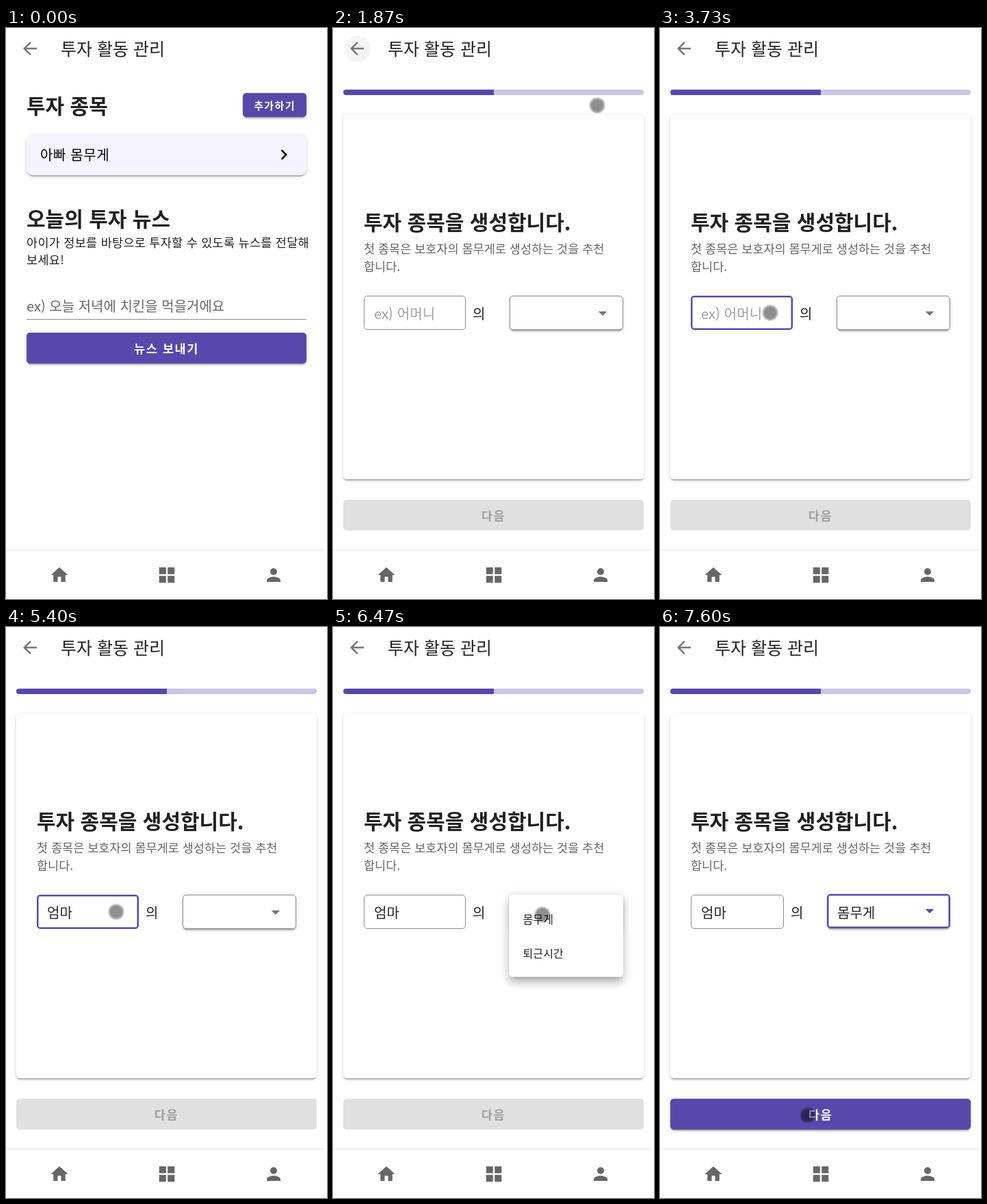
An HTML page that plays this animation: 469x834 px, repeating every 8000 ms.

```html
<!DOCTYPE html>
<html lang="ko">
<head>
<meta charset="utf-8">
<title>투자 활동 관리</title>
<style>
:root {
  --main: #5848ab;
  --ink: #212121;
  --low: 0 4px 1px -2.5px #0003, 0 2.5px 2.5px #00000024, 0 1px 6px #0000001f;
  --high: 0 6px 6px -4px #0003, 0 10px 12px 1px #00000024, 0 4px 17px 2px #0000001f;
  --focus: inset 0 0 0 1px #5848ab80;
}
html, body { margin: 0; width: 100%; height: 100%; overflow: hidden; background: #fff; }
#stage {
  position: relative; width: 469px; height: 834px; overflow: hidden; background: #fff; color: var(--ink);
  font-family: "Noto Sans CJK KR", "Noto Sans CJK JP", "Noto Sans CJK SC", "Noto Sans KR", sans-serif;
}
#stage * { box-sizing: border-box; }
#stage div, p, svg { position: absolute; margin: 0; }
p { line-height: 0; white-space: nowrap; font-size: 20px; }
svg { width: 30px; height: 30px; fill: #666; overflow: visible; }
.anim { animation: 8s step-end infinite; }
.page { inset: 0; }
.title { font-size: 25px; }
.head { font-size: 30px; font-weight: 700; }
.body { font-size: 17.5px; }
.spaced { letter-spacing: .016em; }
.grey { color: #666; }
.item { font-size: 16px; letter-spacing: .15px; left: 20.5px; }
.btn {
  display: flex; align-items: center; justify-content: center; border-radius: 5px;
  background: var(--main); color: #fff; box-shadow: var(--low);
  font-size: 17.5px; font-weight: 700; letter-spacing: .0893em; line-height: 1;
}
.field { border: 1px solid #8c8c8c; border-radius: 5px; top: 391px; height: 50px; }

/* 1% = 80 ms */
#first { animation-name: first; }
@keyframes first { 0% { opacity: 1 } 22.5% { opacity: 0 } }
#second { animation-name: second; }
@keyframes second { 0% { opacity: 0 } 22.5% { opacity: 1 } }
#halo { left: 15.5px; top: 10.5px; width: 39px; height: 39px; border-radius: 50%; background: #f4f4f4; animation-name: halo; }
@keyframes halo { 0% { opacity: 0 } 23.375% { opacity: 1 } 40% { opacity: 0 } }

#name { left: 45px; width: 149px; animation-name: name; }
@keyframes name {
  0% { width: 149px; border: 1px solid #8c8c8c; box-shadow: none }
  40% { width: 149px; border: 2px solid var(--main); box-shadow: var(--focus) }
  75.875% { width: 149px; border: 1px solid #8c8c8c; box-shadow: none }
  86.625% { width: 136px; border: 1px solid #8c8c8c; box-shadow: none }
}
#typed { left: 60px; top: 402px; width: 110px; height: 30px; overflow: hidden; }
#lines { font-size: 20px; line-height: 30px; white-space: nowrap; letter-spacing: .1px; animation-name: lines; }
#lines span { display: block; height: 30px; }
@keyframes lines {
  0% { transform: none }
  55% { transform: translateY(-30px) }
  55.875% { transform: translateY(-60px) }
  58.375% { transform: translateY(-90px) }
  60% { transform: translateY(-120px) }
  61.625% { transform: translateY(-150px) }
}
#caret { left: 60.5px; top: 404px; width: 1px; height: 24px; background: #000; animation-name: caret; }
@keyframes caret {
  0% { opacity: 0 }
  40% { opacity: 1 }
  46.625% { opacity: 0 }
  53.375% { opacity: 1; transform: none }
  55% { opacity: 1; transform: translateX(18px) }
  60% { opacity: 1; transform: translateX(36px) }
  67.5% { opacity: 0 }
  74.125% { opacity: 1; transform: translateX(36px) }
  75.875% { opacity: 0 }
}
#of { animation-name: of; }
@keyframes of { 0% { transform: none } 86.625% { transform: translateX(-13px) } }

#select { background: #fff; animation-name: select; }
@keyframes select {
  0% { left: 257.5px; width: 166.5px; top: 391px; border: 1px solid #8c8c8c; box-shadow: var(--low) }
  86.625% { left: 244px; width: 180px; top: 390px; border: 2px solid var(--main); box-shadow: var(--focus), var(--low) }
}
#value { animation-name: value; }
@keyframes value { 0% { opacity: 0 } 86.625% { opacity: 1 } }
#arrow { left: 379px; top: 402px; transform-origin: 50% 50%; animation-name: arrow; }
@keyframes arrow {
  0% { fill: #757575; transform: none }
  86.625% { fill: var(--main); transform: translateY(-2px) rotate(115deg) }
  87.5% { fill: var(--main); transform: translateY(-2px) rotate(55deg) }
  88.375% { fill: var(--main); transform: translateY(-2px) rotate(15deg) }
  89.125% { fill: var(--main); transform: translateY(-2px) }
}
#menu { left: 257px; top: 391px; width: 167px; height: 120px; border-radius: 5px; background: #fff; box-shadow: var(--high); transform-origin: 0 0; animation-name: menu; }
@keyframes menu {
  0% { opacity: 0 }
  78.375% { opacity: .6; transform: scale(.88) }
  79.125% { opacity: 1; transform: scale(.97) }
  80% { opacity: 1; transform: none }
  86.625% { opacity: .6; transform: none }
  87.5% { opacity: 0 }
}
#row { left: 0; top: 10.5px; width: 167px; height: 49.5px; overflow: hidden; animation-name: row; }
@keyframes row { 0% { background: #fff } 85% { background: #ededed } }
#ripple { left: 12.5px; top: -24px; width: 99px; height: 99px; border-radius: 50%; background: #bfb8db; animation-name: ripple; }
@keyframes ripple { 0% { opacity: 0 } 86.625% { opacity: 1 } }
#pick { animation-name: pick; }
@keyframes pick { 0% { color: var(--ink) } 86.625% { color: var(--main) } }

#next { left: 15px; top: 689px; width: 439px; height: 45px; animation-name: next; }
@keyframes next {
  0% { background: #e0e0e0; color: #9e9e9e; box-shadow: none }
  86.625% { background: var(--main); color: #fff; box-shadow: none }
  88.375% { background: var(--main); color: #fff; box-shadow: var(--low) }
}
#nav { left: 0; top: 764px; width: 469px; height: 70px; background: #fff; box-shadow: 0 -1px 6px #0000001c; }
#touch {
  left: -11.5px; top: -11.5px; width: 23px; height: 23px; border-radius: 50%;
  background: #00000070 padding-box; border: 2px solid #00000044; animation-name: touch;
}
@keyframes touch {
  0% { opacity: 0 }
  14.125% { opacity: 1; transform: translate(398.5px, 126.5px) }
  16.625% { opacity: 0 }
  19.125% { opacity: 1; transform: translate(385.5px, 112.5px) }
  31.625% { opacity: 0 }
  40% { opacity: 1; transform: translate(160.5px, 415.5px) }
  70% { opacity: 0 }
  75.875% { opacity: 1; transform: translate(305.5px, 419.5px); background-color: #00000070 }
  81.625% { opacity: 1; transform: translate(305.5px, 419.5px); background-color: #00000070; animation-timing-function: linear }
  85% { opacity: 1; transform: translate(306.5px, 432.5px); background-color: #00000094 }
  89.125% { opacity: 0 }
  95% { opacity: 1; transform: translate(215.5px, 712.5px); background-color: #00000078 }
}
</style>
</head>
<body>
<div id="stage">
  <div id="first" class="page anim">
    <p class="head" style="left:30px;top:112px">투자 종목</p>
    <div class="btn" style="left:346px;top:95px;width:93px;height:35px;font-size:15px">추가하기</div>
    <div style="left:30px;top:155px;width:409px;height:60px;border-radius:9px;background:#f5f3ff;box-shadow:var(--low)"></div>
    <p style="left:50px;top:185px;letter-spacing:.03125em;color:#000">아빠 몸무게</p>
    <svg viewBox="0 0 24 24" style="left:391px;top:170px;fill:#000"><path d="M10 6 8.6 7.4 13.2 12l-4.6 4.6L10 18l6-6z"/></svg>
    <p class="head" style="left:30px;top:277px">오늘의 투자 뉴스</p>
    <p class="body spaced" style="left:30px;top:312.5px">아이가 정보를 바탕으로 투자할 수 있도록 뉴스를 전달해</p>
    <p class="body spaced" style="left:30px;top:337.5px">보세요!</p>
    <p class="grey" style="left:30px;top:406px">ex) 오늘 저녁에 치킨을 먹을거에요</p>
    <div style="left:30px;top:425px;width:409px;height:1px;background:#8c8c8c"></div>
    <div class="btn" style="left:30px;top:445px;width:409px;height:45px">뉴스 보내기</div>
  </div>

  <div id="second" class="page anim">
    <div id="halo" class="anim"></div>
    <div style="left:15px;top:90px;width:439px;height:7.5px;border-radius:4px;background:linear-gradient(90deg,var(--main) 220px,#cbc4e7 0)"></div>
    <div style="left:15px;top:127px;width:439px;height:532px;border-radius:5px;background:#fff;box-shadow:var(--low)"></div>
    <p class="head" style="left:45px;top:282px">투자 종목을 생성합니다.</p>
    <p class="body grey" style="left:45px;top:322px">첫 종목은 보호자의 몸무게로 생성하는 것을 추천</p>
    <p class="body grey" style="left:45px;top:347.5px">합니다.</p>
    <div id="name" class="field anim"></div>
    <div id="typed"><div id="lines" class="anim">
      <span style="color:#9e9e9e">ex) 어머니</span><span>ㅇ</span><span>어</span><span>엄</span><span>엄ㅁ</span><span>엄마</span>
    </div></div>
    <div id="caret" class="anim"></div>
    <p id="of" class="anim" style="left:204px;top:416.5px">의</p>
    <div id="select" class="field anim"></div>
    <p id="value" class="anim" style="left:259px;top:416.5px">몸무게</p>
    <svg id="arrow" class="anim" viewBox="0 0 24 24"><path d="M7 9.6h10l-5 5z"/></svg>
    <div id="menu" class="anim">
      <div id="row" class="anim"><div id="ripple" class="anim"></div></div>
      <p id="pick" class="item anim" style="top:34.5px">몸무게</p>
      <p class="item" style="top:84.5px">퇴근시간</p>
    </div>
    <div id="next" class="btn anim">다음</div>
  </div>

  <svg viewBox="0 0 24 24" style="left:20px;top:15px;fill:#757575"><path d="M20 11H7.8l5.6-5.6L12 4l-8 8 8 8 1.4-1.4L7.8 13H20z"/></svg>
  <p class="title" style="left:80px;top:29px">투자 활동 관리</p>
  <div id="nav">
    <svg viewBox="0 0 24 24" style="left:63px;top:20px"><path d="M10 20v-6h4v6h5v-8h3L12 3 2 12h3v8z"/></svg>
    <svg viewBox="0 0 24 24" style="left:219.5px;top:20px"><path d="M3 3h8v8H3zM13 3h8v8h-8zM3 13h8v8H3zM13 13h8v8h-8z"/></svg>
    <svg viewBox="0 0 24 24" style="left:376px;top:20px"><circle cx="12" cy="8" r="4"/><path d="M12 14c-2.7 0-8 1.3-8 4v2h16v-2c0-2.7-5.3-4-8-4z"/></svg>
  </div>
  <div id="touch" class="anim"></div>
</div>
</body>
</html>
```
